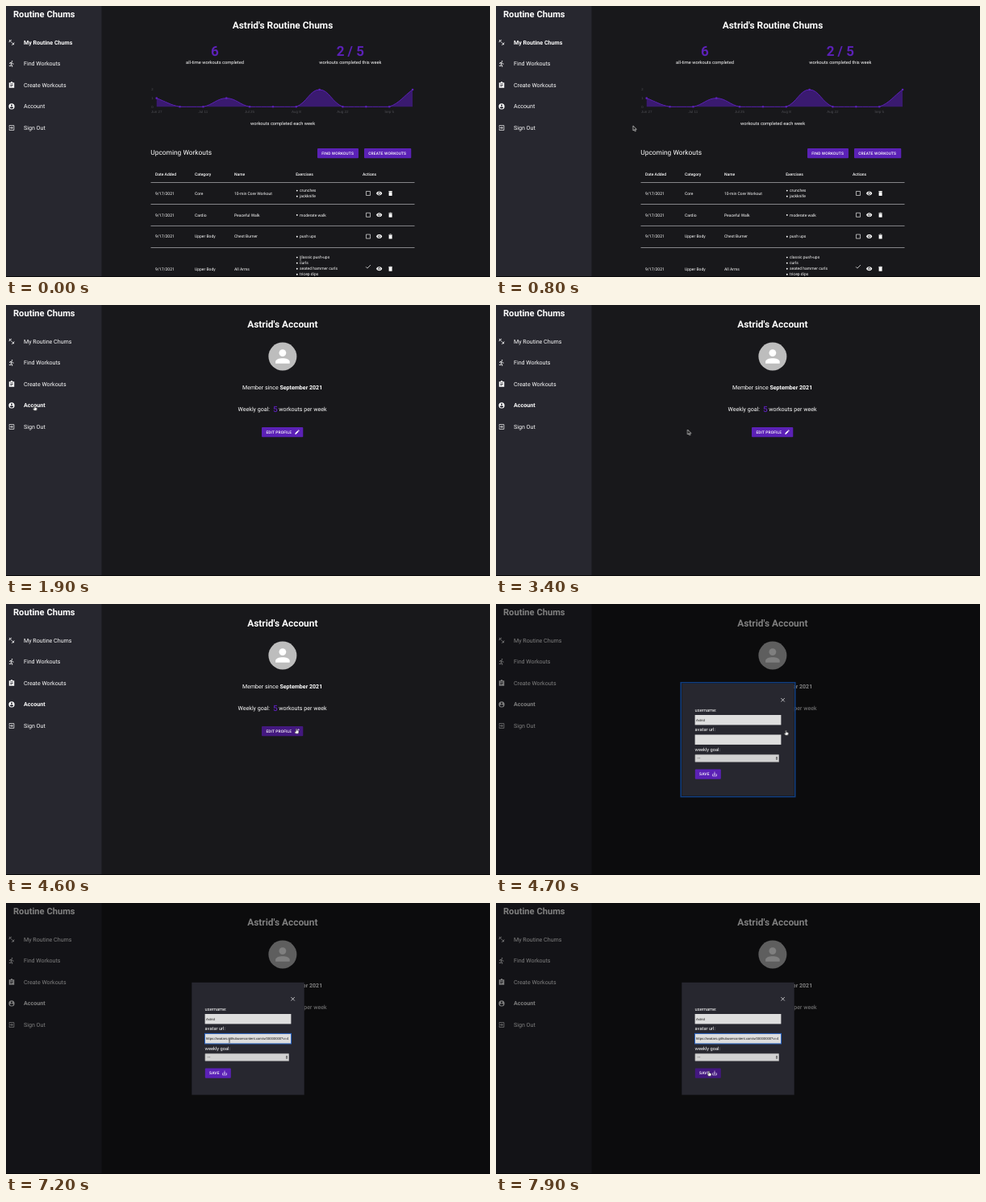
An HTML page for the animation above (8 s loop, 600x337 px).

```html
<!DOCTYPE html>
<html lang="en">
<head>
<meta charset="utf-8">
<title>Routine Chums</title>
<style>
  html, body { margin: 0; width: 100%; height: 100%; overflow: hidden; background: #18181b; }
  svg { display: block; width: 100%; height: 100%; }
  text { fill: #fff; font-family: Roboto, sans-serif; text-rendering: geometricPrecision; white-space: pre; }
  .mid { text-anchor: middle; }
  .bold { font-weight: 700; }
  .medium { font-weight: 500; }
  .button { font-weight: 500; letter-spacing: .028em; }
  .violet { fill: #5b21b6; }
  .field, .axis { font-family: "Liberation Sans", Arial, sans-serif; }
  .field { fill: #111; }
  .axis { fill: #4d4d52; }
  .line { fill: none; stroke: currentColor; stroke-width: 2; }
  .solid { fill: currentColor; }
  .icon { color: #fff; }

  .play { animation: 8s step-end infinite; }
  #home { animation-name: home; }
  #account { animation-name: account; }
  #modal { animation-name: modal; }
  #ring { animation-name: ring; }
  #focus { animation-name: focus; }
  #url { animation-name: url; }
  #navHover { animation-name: nav-hover; }
  #navRest { animation-name: nav-rest; }
  #editFill { animation-name: edit-hover; }
  #saveFill { animation-name: save-hover; }
  #cursor { animation: move 8s infinite; }
  #arrow { animation-name: arrow; }
  #hand { animation-name: hand; }
  #beam { animation-name: beam; }

  @keyframes home { 0% { opacity: 1 } 21.25%, 100% { opacity: 0 } }
  @keyframes account { 0% { opacity: 0 } 21.25%, 100% { opacity: 1 } }
  @keyframes modal { 0% { opacity: 0 } 58.75%, 100% { opacity: 1 } }
  @keyframes ring { 0% { opacity: 1 } 66.25%, 100% { opacity: 0 } }
  @keyframes focus { 0% { opacity: 0 } 66.25%, 100% { opacity: 1 } }
  @keyframes url { 0% { opacity: 0 } 80%, 100% { opacity: 1 } }
  @keyframes nav-hover { 0% { opacity: 0 } 18.75%, 100% { opacity: 1 } }
  @keyframes nav-rest { 0% { opacity: 1 } 18.75%, 100% { opacity: 0 } }
  @keyframes edit-hover { 0% { fill: #5b21b6 } 52.5%, 100% { fill: #43187f } }
  @keyframes save-hover { 0% { fill: #5b21b6 } 97.5%, 100% { fill: #43187f } }
  @keyframes arrow {
    0% { opacity: 0 } 1.25% { opacity: 1 } 18.75% { opacity: 0 } 30% { opacity: 1 }
    52.5% { opacity: 0 } 60% { opacity: 1 } 65% { opacity: 0 } 72.5% { opacity: 1 }
    86.25% { opacity: 0 } 92.5% { opacity: 1 } 97.5%, 100% { opacity: 0 }
  }
  @keyframes hand {
    0% { opacity: 0 } 18.75% { opacity: 1 } 30% { opacity: 0 }
    52.5% { opacity: 1 } 60% { opacity: 0 } 97.5%, 100% { opacity: 1 }
  }
  @keyframes beam {
    0% { opacity: 1 } 1.25% { opacity: 0 } 65% { opacity: 1 } 72.5% { opacity: 0 }
    86.25% { opacity: 1 } 92.5%, 100% { opacity: 0 }
  }
  /* One step per 100 ms tick of each movement. */
  @keyframes move {
    0% { transform: translate(365px, 314px); animation-timing-function: steps(2) }
    2.5%, 3.75% { transform: translate(318px, 173px); animation-timing-function: steps(3) }
    7.5%, 8.75% { transform: translate(193px, 152px); animation-timing-function: steps(6) }
    16.25% { transform: translate(54px, 133px); animation-timing-function: steps(3) }
    20%, 28.75% { transform: translate(35.5px, 125px); animation-timing-function: steps(3) }
    32.5% { transform: translate(232px, 153px); animation-timing-function: step-end }
    42.5% { transform: translate(237.5px, 155px); animation-timing-function: steps(2) }
    45%, 46.25% { transform: translate(339px, 209px); animation-timing-function: steps(5) }
    52.5% { transform: translate(357px, 159px); animation-timing-function: steps(4) }
    57.5% { transform: translate(360px, 155px); animation-timing-function: steps(1) }
    58.75% { transform: translate(359.5px, 157px); animation-timing-function: steps(5) }
    65% { transform: translate(262px, 169px); animation-timing-function: steps(2) }
    67.5%, 71.25% { transform: translate(256px, 170px); animation-timing-function: steps(3) }
    75%, 83.75% { transform: translate(350px, 208px); animation-timing-function: steps(2) }
    86.25%, 88.75% { transform: translate(258px, 170px); animation-timing-function: steps(1) }
    90% { transform: translate(277px, 171px); animation-timing-function: steps(7) }
    98.75%, 100% { transform: translate(264px, 209px); animation-timing-function: step-end }
  }
</style>
</head>
<body>
<svg viewBox="0 0 600 337">
  <defs>
    <symbol id="i-weights" viewBox="0 0 24 24"><path class="line" stroke-width="3" d="M7 7l10 10"/><path class="solid" d="M2 10.6L10.6 2 12 3.4 3.4 12zM3 5l2-2 3 3-2 2zM12 20.6L20.6 12l1.4 1.4-8.6 8.6zM16 18l2-2 3 3-2 2z"/></symbol>
    <symbol id="i-run" viewBox="0 0 24 24"><circle class="solid" cx="13.5" cy="3.5" r="2"/><path class="line" style="stroke-width:2.4" d="M5.8 12.5V9l5-2.2 2.4 3.4 1.5 1.5 4.3 1M11.5 8l-1.6 6.5 4 3V23M10.2 14.5L9 20l-6-1.3"/></symbol>
    <symbol id="i-list" viewBox="0 0 24 24"><path class="solid" fill-rule="evenodd" d="M3 3h6a3 3 0 0 1 6 0h6v18H3zM7 7v2h10V7zM7 11v2h10v-2zM7 15v2h7v-2z"/></symbol>
    <symbol id="i-user" viewBox="0 0 24 24"><path class="solid" fill-rule="evenodd" d="M2 12a10 10 0 0 1 20 0a10 10 0 0 1-20 0zM9 8a3 3 0 0 0 6 0a3 3 0 0 0-6 0zM6 16c2 4.3 10 4.3 12 0c0-4.2-12-4.2-12 0z"/></symbol>
    <symbol id="i-exit" viewBox="0 0 24 24"><path class="line" d="M4 9V4h16v16H4v-5M3 12h12M11 7.5l4.5 4.5-4.5 4.5"/></symbol>
    <symbol id="i-box" viewBox="0 0 24 24"><path class="line" d="M4 4h16v16H4z"/></symbol>
    <symbol id="i-eye" viewBox="0 0 24 24"><path class="solid" fill-rule="evenodd" d="M1 12c4-10 18-10 22 0c-4 10-18 10-22 0zM7 12a5 5 0 0 0 10 0a5 5 0 0 0-10 0z"/><circle class="solid" cx="12" cy="12" r="3"/></symbol>
    <symbol id="i-bin" viewBox="0 0 24 24"><path class="solid" d="M6 7h12v14H6zM5 4h3.5l1-1h5l1 1H19v2H5z"/></symbol>
    <symbol id="i-check" viewBox="0 0 24 24"><path class="line" d="M4 12.7l5 5L20.3 6.3"/></symbol>
    <symbol id="i-close" viewBox="0 0 24 24"><path class="line" d="M5.7 5.7l12.6 12.6M18.3 5.7L5.7 18.3"/></symbol>
    <symbol id="i-pen" viewBox="0 0 24 24"><path class="solid" d="M3 17.2V21h3.8L17.8 10 14 6.2zM15.1 5.1l2.6-2.5 3.8 3.8-2.6 2.5z"/></symbol>
    <symbol id="i-save" viewBox="0 0 24 24"><path class="line" d="M4 12v8h16v-8M12 3v12M7.5 10.8l4.5 4.5 4.5-4.5"/></symbol>
    <symbol id="i-person" viewBox="0 0 24 24"><circle class="solid" cx="12" cy="8" r="4"/><path class="solid" d="M4 20v-2c0-5.3 16-5.3 16 0v2z"/></symbol>
  </defs>
  <rect width="600" height="337" fill="#18181b"/>
  <rect width="118.5" height="337" fill="#27272f"/>
  <g id="home" class="play"></g>
  <g id="account" class="play"></g>
  <g id="modal" class="play"></g>
  <rect y="336" width="600" height="1" fill="#08080a"/>
  <g id="cursor">
    <path id="arrow" class="play" d="M0 0V6L1.4 4.8 2.4 7 3.4 6.5 2.5 4.4H4.3Z" fill="#111" stroke="#fff" stroke-width=".6"/>
    <path id="hand" class="play" d="M-.6 .3Q0-.4 .6 .3V2.3L2.6 2.9Q3.2 3.2 3 4.2L2.4 6.2H-.6L-2.2 3.9Q-2 3-.6 4Z" fill="#fff" stroke="#222" stroke-width=".5"/>
    <path id="beam" class="play" d="M-1.3-3.2Q0-3.2 0-2.2V2.2Q0 3.2-1.3 3.2M1.3-3.2Q0-3.2 0-2.2V2.2Q0 3.2 1.3 3.2M-.8 1H.8" fill="none" stroke="#777" stroke-width=".7"/>
  </g>
</svg>
<script>
  const APP = 'Routine Chums';
  const USER = 'Astrid';
  const VIOLET = '#5b21b6';

  const text = (x, y, size, str, cls = '', id = '') =>
    `<text x="${x}" y="${y}" font-size="${size}" class="${cls}"${id && ` id="${id}"`}>${str}</text>`;
  const rect = (x, y, w, h, attrs) => `<rect x="${x}" y="${y}" width="${w}" height="${h}" ${attrs}/>`;
  const icon = (name, cx, cy, size = 8) =>
    `<use href="#i-${name}" class="icon" x="${cx - size / 2}" y="${cy - size / 2}" width="${size}" height="${size}"/>`;
  const button = (x, y, w, label, pad, id) =>
    rect(x, y, w, 12.2, `rx="1" fill="${VIOLET}" ${id ? `id="${id}" class="play"` : ''}`) +
    text(x + pad, y + 7.9, 4.87, label, 'button');

  function nav(active) {
    const items = [['weights', 'My ' + APP], ['run', 'Find Workouts'], ['list', 'Create Workouts'],
      ['user', 'Account'], ['exit', 'Sign Out']];
    let out = text(9, 14.4, 11.15, APP, 'bold');
    items.forEach(([name, label], i) => {
      const y = 45.3 + i * 26.55;
      out += icon(name, 7, y, 8.6);
      if (active === 0 && i === 3) {
        out += text(22, y + 2.5, 7.1, label, 'play', 'navRest') +
          text(22, y + 2.5, 7.1, label, 'bold play', 'navHover');
      } else {
        out += text(22, y + 2.5, 7.1, label, i === active ? 'bold' : '');
      }
    });
    return out;
  }

  function chart() {
    const top = 104, base = 125.3, step = 28.85;
    const pts = [1, 0, 0, 1, 0, 0, 0, 2, 0, 0, 0, 2]
      .map((v, i) => [186.7 + i * step, base - v * (base - top) / 2]);
    const clamp = y => Math.max(top, Math.min(base, y));
    // Handles follow the chord between neighbours, weighted by segment length.
    const handles = pts.map((p, i) => {
      const a = pts[i - 1] || p, b = pts[i + 1] || p;
      const da = Math.hypot(p[0] - a[0], p[1] - a[1]), db = Math.hypot(b[0] - p[0], b[1] - p[1]);
      const at = k => [p[0] + k * (b[0] - a[0]), clamp(p[1] + k * (b[1] - a[1]))];
      return [at(-.4 * da / (da + db)), at(.4 * db / (da + db))];
    });
    let d = 'M' + pts[0];
    for (let i = 1; i < pts.length; i++) d += `C${handles[i - 1][1]} ${handles[i][0]} ${pts[i]}`;
    let out = `<path d="${d}V${base}H${pts[0][0]}Z" fill="#3a1a70"/>` +
      `<path d="${d}" fill="none" stroke="${VIOLET}" stroke-width="1"/>`;
    pts.forEach(([x, y]) => out += `<circle cx="${x}" cy="${y}" r="1.3" fill="${VIOLET}"/>`);
    ['Jun 27', 'Jul 11', 'Jul 25', 'Aug 8', 'Aug 22', 'Sep 5'].forEach((s, i) =>
      out += text(186.7 + i * step * 2, 133.2, 4.5, s, 'axis mid'));
    [0, 1, 2].forEach(v => out += text(181.3, base + 1.4 - v * 10.65, 4.2, v, 'axis mid'));
    return out;
  }

  function table() {
    const cols = [185, 234, 283, 359.3, 442];
    let out = '';
    ['Date Added', 'Category', 'Name', 'Exercises', 'Actions'].forEach((s, i) =>
      out += text(cols[i], 211.3, 5, s, 'medium'));
    [219.5, 246.5, 273.3, 300.5].forEach(y => out += rect(179.5, y - .35, 327, .7, 'fill="#b4b4b8"'));
    const rows = [
      [233, 'Core', '10-min Core Workout', ['crunches', 'jackknife']],
      [259.8, 'Cardio', 'Peaceful Walk', ['moderate walk']],
      [286.6, 'Upper Body', 'Chest Burner', ['push ups']],
      [326.7, 'Upper Body', 'All Arms',
        ['classic push-ups', 'curls', 'seated hammer curls', 'tricep dips', 'tricep extensions']]
    ];
    rows.forEach(([y, type, name, moves], r) => {
      ['9/17/2021', type, name].forEach((s, i) => out += text(cols[i], y + 1.8, 5, s));
      moves.forEach((s, i) => {
        const my = y + (i - (moves.length - 1) / 2) * 7.05 - (r === 3 ? 3.2 - 0 : 0) + (r === 3 ? 0 : .1);
        const shift = r === 3 ? 3.2 : 0;
        out += `<circle cx="360.8" cy="${my + shift}" r=".95" fill="#fff"/>` + text(364, my + shift + 1.7, 5, s);
      });
      out += r === 3 ? icon('check', 449, y - 2.6, 8.6) : icon('box', 449, y, 7.6);
      out += icon('eye', 462.7, y, 8) + icon('bin', 476.6, y, 8);
    });
    return out;
  }

  function home() {
    return nav(0) +
      text(343, 28, 11.9, `${USER}'s ${APP}`, 'bold mid') +
      text(259, 62.4, 17, '6', 'bold mid violet') +
      text(426.8, 62.4, 17, '2 / 5', 'bold mid violet') +
      text(259, 72.3, 5.69, 'all-time workouts completed', 'mid') +
      text(426.8, 72.3, 5.69, 'workouts completed this week', 'mid') +
      chart() +
      text(343, 148.3, 5.69, 'workouts completed each week', 'mid') +
      text(179.3, 185.2, 8.4, 'Upcoming Workouts') +
      button(386, 177, 51, 'FIND WORKOUTS', 5.3) +
      button(444, 177, 58.3, 'CREATE WORKOUTS', 5.3) +
      table();
  }

  function account() {
    return nav(3) +
      text(342.8, 28, 11.9, `${USER}'s Account`, 'bold mid') +
      '<circle cx="342.9" cy="64" r="17.5" fill="#bdbdbd"/>' + icon('person', 342.9, 64, 26.4) +
      text(342.6, 104.7, 7.07, 'Member since <tspan class="bold">September 2021</tspan>', 'mid') +
      text(287.6, 132.4, 7.1, 'Weekly goal:') +
      text(333.9, 133, 10, '5', 'medium mid violet') +
      text(338.2, 132.4, 7.1, 'workouts per week') +
      button(317, 152, 51.3, 'EDIT PROFILE', 5.4, 'editFill') + icon('pen', 361, 158, 7);
  }

  function modal() {
    const input = y => rect(246.6, y, 106.8, 12.4, 'fill="#dedede"');
    return rect(0, 0, 600, 337, 'fill="#000" opacity=".5"') +
      rect(230.3, 98.8, 139.4, 139.8, 'fill="#27272f"') +
      rect(229.2, 97.7, 141.6, 142, 'id="ring" class="play" fill="none" stroke="#123f80" stroke-width="1.5"') +
      icon('close', 355.6, 119.3, 8.4) +
      text(246.6, 133.6, 5.75, 'username:') + input(138) + text(248, 145.8, 4.2, USER, 'field') +
      text(246.6, 158, 5.75, 'avatar url:') + input(162.5) +
      rect(246.5, 162.4, 107, 12.6, 'id="focus" class="play" fill="none" stroke="#2c68c8" stroke-width="1"') +
      text(248, 170.2, 4.2, 'https://avatars.githubusercontent.com/u/00000000?v=4', 'field play', 'url') +
      text(246.6, 182.6, 5.75, 'weekly goal:') +
      rect(246.8, 187.2, 104, 9.4, 'rx=".6" fill="#d2d2d2" stroke="#8b8b8b" stroke-width=".4"') +
      text(249.3, 193.3, 4.2, '---', 'field') +
      '<path d="M346.8 191.5l1.2-1.7 1.2 1.7zM346.8 192.4l1.2 1.7 1.2-1.7z" fill="#222"/>' +
      button(246.8, 205.5, 32, 'SAVE', 5.3, 'saveFill') + icon('save', 271, 211.4, 7.4);
  }

  for (const part of [home, account, modal]) document.getElementById(part.name).innerHTML = part();
</script>
</body>
</html>
```
